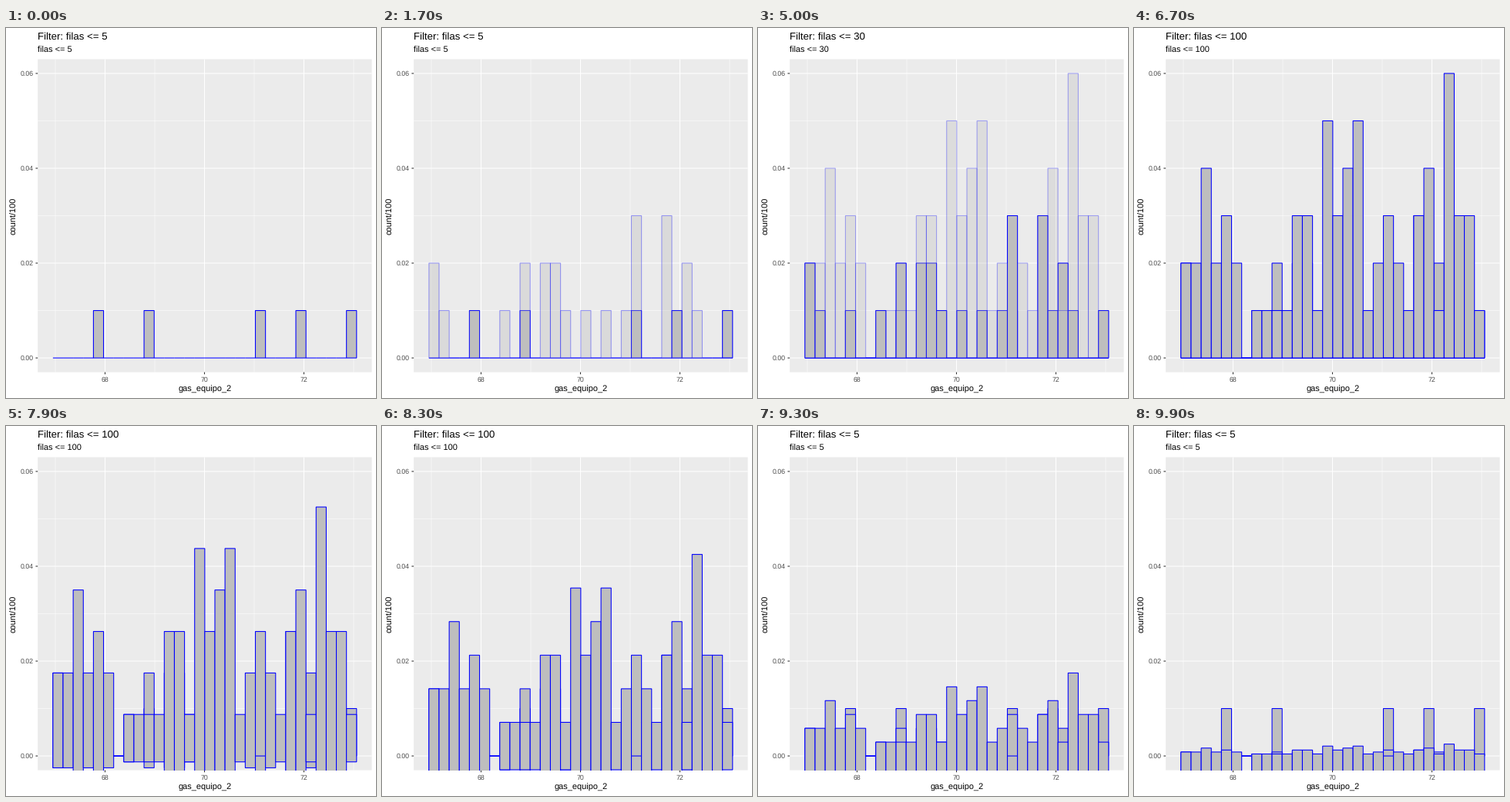
A matplotlib script that plays this animation: 480x480 px, repeating every 10 s.

```python
import matplotlib.pyplot as plt
from matplotlib.animation import FuncAnimation
from matplotlib.patches import Rectangle

plt.rcParams["font.family"] = "Liberation Sans"
plt.rcParams["text.hinting"] = "none"

SIZE, DPI = 480, 72
FRAMES, INTERVAL = 100, 100
LEFT, RIGHT, TOP, BOTTOM = 41.2, 474.5, 40.5, 446.5
BASE, UNIT = 428.05, 61.52           # y of zero, pixels per 0.01
BAR_X, BAR_W = 60.9, 13.13
LINE = 1.07

# Bar counts of the rows added by each filter step
FIRST = [1 if i in (4, 9, 20, 24, 29) else 0 for i in range(30)]
SECOND = [2, 1, 0, 0, 1, 0, 0, 1, 0, 2, 0, 2, 2, 1, 0,
          1, 0, 1, 0, 1, 3, 0, 0, 3, 1, 2, 1, 0, 0, 0]
THIRD = [2, 2, 4, 2, 3, 2, 0, 1, 1, 1, 1, 3, 3, 1, 5,
         3, 4, 5, 1, 2, 0, 2, 1, 3, 4, 1, 6, 3, 3, 1]

# Start and end of each transition, in frames
ENTER_2, ENTER_3, EXIT = (8, 33), (42, 67), (76, 100)


def px(value):
    return 128.5 + (value - 68) * 64.5


def py(value):
    return BASE - value * 100 * UNIT


def progress(frame, span):
    start, end = span
    return min(1, max(0, (frame - start) / (end - start)))


fig = plt.figure(figsize=(SIZE / DPI, SIZE / DPI), dpi=DPI, facecolor="white")
ax = fig.add_axes([0, 0, 1, 1])
ax.set_xlim(0, SIZE)
ax.set_ylim(SIZE, 0)
ax.axis("off")

panel = Rectangle((LEFT, TOP), RIGHT - LEFT, BOTTOM - TOP,
                  facecolor="#EBEBEB", linewidth=0, snap=False)
ax.add_patch(panel)


def line(xs, ys, color, width, z):
    ax.plot(xs, ys, color=color, lw=width, zorder=z, snap=False,
            solid_capstyle="butt")


def text(x, y, label, size, color="black", **kw):
    return ax.text(x, y, label, fontsize=size, color=color, **kw)


for x in (67, 69, 71, 73):
    line([px(x)] * 2, [TOP, BOTTOM], "white", LINE / 2, 2)
for y in (0.01, 0.03, 0.05):
    line([LEFT, RIGHT], [py(y)] * 2, "white", LINE / 2, 2)
for x in (68, 70, 72):
    line([px(x)] * 2, [TOP, BOTTOM], "white", LINE, 3)
    line([px(x)] * 2, [BOTTOM, BOTTOM + 2.75], "#333333", LINE, 3)
    text(px(x), 459, str(x), 8.8, "#4D4D4D", ha="center")
for y in (0, 0.02, 0.04, 0.06):
    line([LEFT, RIGHT], [py(y)] * 2, "white", LINE, 3)
    line([LEFT - 2.75, LEFT], [py(y)] * 2, "#333333", LINE, 3)
    text(36.2, py(y) + 3.2, f"{y:.2f}", 8.8, "#4D4D4D", ha="right")

text((LEFT + RIGHT) / 2, 472, "gas_equipo_2", 11, ha="center")
text(13.3, (TOP + BOTTOM) / 2, "count/100", 11, rotation=90,
     ha="right", va="center", rotation_mode="default").set(
         ha="center", va="baseline", rotation_mode="anchor")
title = text(LEFT, 15, "", 13.2)
subtitle = text(LEFT, 32, "", 11)


def make_bars(counts, z):
    bars = []
    for i, n in enumerate(counts):
        bar = Rectangle((BAR_X + i * BAR_W, BASE - n * UNIT), BAR_W, n * UNIT,
                        facecolor="#BEBEBE", edgecolor="#0000FF",
                        linewidth=LINE, joinstyle="miter", snap=False,
                        zorder=z)
        ax.add_patch(bar)
        bar.set_clip_path(panel)
        bars.append(bar)
    return bars


make_bars(FIRST, 4)
second = make_bars(SECOND, 5)
third = make_bars(THIRD, 6)


def place(bars, alpha, drop):
    """Fade bars in and slide each one down by a share of its own height."""
    for bar in bars:
        bar.set_visible(alpha > 0)
        bar.set_alpha(alpha)
        bar.set_y(BASE - bar.get_height() * (1 - drop))


def draw(frame):
    drop = progress(frame, EXIT)
    place(second, progress(frame, ENTER_2), drop)
    place(third, progress(frame, ENTER_3), drop)
    if frame < 21 or frame >= 88:
        limit = 5
    else:
        limit = 30 if frame < 55 else 100
    title.set_text(f"Filter: filas <= {limit}")
    subtitle.set_text(f"filas <= {limit}")
    return second + third + [title, subtitle]


anim = FuncAnimation(fig, draw, frames=FRAMES, interval=INTERVAL,
                     init_func=lambda: draw(0), repeat=True, repeat_delay=0,
                     blit=False)
plt.show()
```
